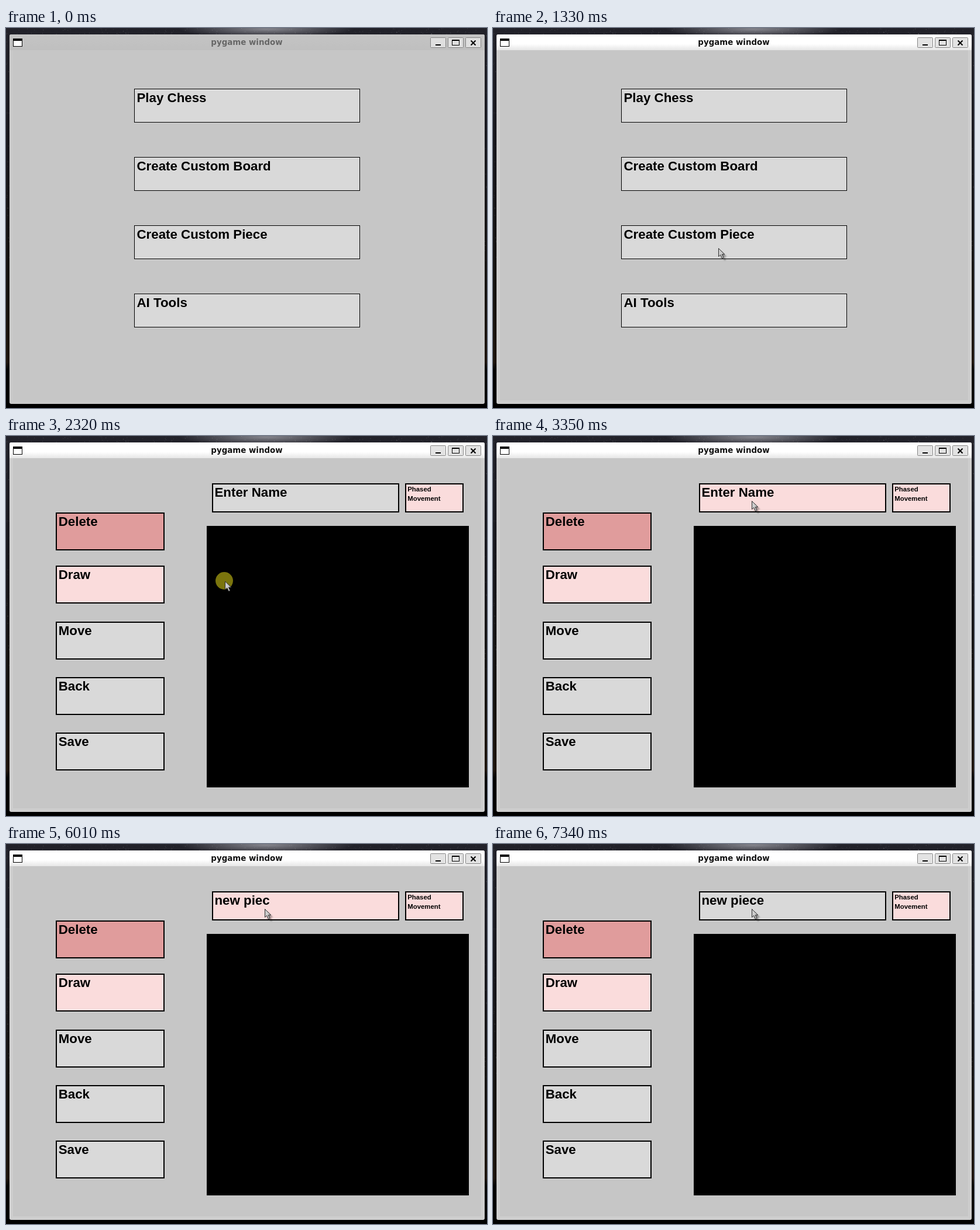
An HTML page that plays this animation: 822 by 651 pixels, repeating every 8000 ms.

```html
<!DOCTYPE html>
<html lang="en">
<head>
<meta charset="utf-8">
<title>Piece editor</title>
<style>
  html, body { margin: 0; width: 100%; height: 100%; overflow: hidden; background: #000; }
  svg { display: block; width: 822px; height: 651px; }
  .label { font: bold 22.3px "Liberation Sans", Arial, sans-serif; }
  .small { font: bold 11.4px "Liberation Sans", Arial, sans-serif; }
  .title { font: bold 13.4px "DejaVu Sans", sans-serif; text-anchor: middle; }
  .notice { font: 32px "Open Sans", "Noto Sans", sans-serif; }
</style>
</head>
<body>
<svg viewBox="0 0 822 651" xmlns="http://www.w3.org/2000/svg">
  <defs>
    <linearGradient id="sky" x2="0" y2="1">
      <stop offset="0" stop-color="#22222a"/>
      <stop offset=".3" stop-color="#17171d"/>
      <stop offset=".7" stop-color="#15120f"/>
      <stop offset=".88" stop-color="#1d140c"/>
      <stop offset=".9" stop-color="#000"/>
    </linearGradient>
    <radialGradient id="glow">
      <stop offset="0" stop-color="#85858d"/>
      <stop offset="1" stop-color="#85858d" stop-opacity="0"/>
    </radialGradient>
    <linearGradient id="barOn" x2="0" y2="1">
      <stop offset="0" stop-color="#f4f4f4"/>
      <stop offset=".15" stop-color="#fff"/>
      <stop offset=".6" stop-color="#fff"/>
      <stop offset="1" stop-color="#e6e6e6"/>
    </linearGradient>
    <linearGradient id="barOff" x2="0" y2="1">
      <stop offset="0" stop-color="#c4c4c4"/>
      <stop offset="1" stop-color="#bfbfbf"/>
    </linearGradient>
    <filter id="soft" x="-50%" y="-50%" width="200%" height="200%">
      <feGaussianBlur stdDeviation="1.2"/>
    </filter>
    <path id="arrow" d="M.5 .5V14.5L3.8 11.6L6.6 17.6L9 16.5L6.3 10.7H10.7Z"/>
  </defs>

  <rect width="822" height="651" fill="url(#sky)"/>
  <ellipse cx="445" cy="2" rx="150" ry="14" fill="url(#glow)"/>
  <g id="stars" fill="#fff"></g>

  <rect id="frame" x="6" y="11" width="812" height="633" rx="3"/>
  <path id="bar" d="M6 38V14q0-3 3-3H815q3 0 3 3V38Z"/>
  <rect x="12" y="38" width="800" height="600" fill="#c6c6c6"/>
  <rect x="12.5" y="18.5" width="15" height="13" fill="#fff" stroke="#000"/>
  <rect x="12" y="18" width="16" height="4"/>
  <text id="title" class="title" x="411.5" y="28.5">pygame window</text>
  <g id="controls" stroke="#858585"></g>
  <path d="M734 28h9v2h-9zM762 20h13v10h-13zM763 22v7h11v-7z" fill-rule="evenodd"/>
  <path d="M794.5 21.5l8 8m0-8l-8 8" stroke="#000" stroke-width="2"/>

  <g id="menu"></g>
  <g id="submenu"></g>
  <g id="editor">
    <rect x="343" y="154" width="448" height="448"/>
  </g>

  <circle id="click" cx="373" cy="248" r="15" fill="#7b750d"/>
  <g id="cursor">
    <use href="#arrow" x="4" y="4" opacity=".34" filter="url(#soft)"/>
    <use href="#arrow" fill="#cbcbcb" stroke="#303030"/>
  </g>

  <g id="notice">
    <rect width="822" height="651" fill="#d8d8d8"/>
    <text class="notice" x="66.5" y="339">Press enter to save your added text to the box</text>
  </g>
</svg>
<script>
const LOOP = 8000;
const GREY = "#d9d9d9", PINK = "#fadcdc", RED = "#e09c9c";
const $ = id => document.getElementById(id);

function add(parent, tag, attrs, text = "") {
  const node = document.createElementNS("http://www.w3.org/2000/svg", tag);
  for (const key in attrs) node.setAttribute(key, attrs[key]);
  node.textContent = text;
  parent.append(node);
  return node;
}

function box(parent, x, y, width, height, fill, line) {
  return add(parent, "rect", {
    x: x + line / 2, y: y + line / 2, width: width - line, height: height - line,
    fill, stroke: "#000", "stroke-width": line
  });
}

function label(parent, x, y, text, type = "label") {
  return add(parent, "text", { x, y, class: type }, text);
}

function menu(parent, top, names) {
  names.forEach((name, i) => {
    const y = top + 117 * i;
    box(parent, 219, y, 386, 58, GREY, 1);
    label(parent, 223.5, y + 23, name);
  });
}

menu($("menu"), 104, ["Play Chess", "Create Custom Board", "Create Custom Piece", "AI Tools"]);
menu($("submenu"), 237, ["Create New", "Edit", "Back"]);

const editor = $("editor");
[["Delete", 131, RED], ["Draw", 222, PINK], ["Move", 318, GREY], ["Back", 413, GREY], ["Save", 508, GREY]]
  .forEach(([name, y, fill]) => {
    box(editor, 85, y, 186, 65, fill, 2);
    label(editor, 89.7, y + 23, name);
  });
const field = box(editor, 352, 81, 320, 50, GREY, 2);
const fieldText = label(editor, 356.5, 104, "");
box(editor, 682, 81, 100, 50, PINK, 2);
label(editor, 686.2, 95, "Phased", "small");
label(editor, 686.2, 111, "Movement", "small");

for (const x of [725, 755, 785])
  add($("controls"), "rect", { x: x + .5, y: 16.5, width: 26, height: 17, rx: 1 });

// Faint stars along the visible edges of the desktop.
let seed = 7;
const random = () => (seed = seed * 16807 % 2147483647) / 2147483647;
for (let i = 0; i < 260; i++) {
  const top = i < 200;
  add($("stars"), "rect", {
    x: top ? random() * 822 : random() < .6 ? random() * 6 : 818 + random() * 4,
    y: top ? random() * 11 : random() * 400,
    width: 1, height: 1, opacity: random() * .22
  });
}

// Each step changes only the listed parts; the rest carries over.
let state = { screen: "menu", active: false, cursor: null, text: "Enter Name", lit: false, click: false };
const steps = [
  [0, {}],
  [330, { cursor: [351, 365] }],
  [660, { cursor: [356, 367] }],
  [1000, { active: true }],
  [1330, { cursor: [385, 377] }],
  [1660, { screen: "submenu" }],
  [1990, { cursor: [374, 339] }],
  [2320, { screen: "editor", cursor: [374, 248.5], click: true }],
  [2650, { cursor: [346, 274], click: false }],
  [2990, { cursor: [412, 125] }],
  [3350, { cursor: [442, 111], lit: true }],
  [4680, { text: "new " }],
  [5680, { text: "new pie" }],
  [6010, { text: "new piec" }],
  [6340, { screen: "notice" }],
  [7340, { screen: "editor", text: "new piece", lit: false }]
].map(([at, change]) => state = { ...state, ...change, at });

const show = (id, on) => $(id).setAttribute("visibility", on ? "visible" : "hidden");

function render({ screen, active, cursor, text, lit, click }) {
  for (const id of ["menu", "submenu", "editor", "notice"]) show(id, id === screen);
  show("click", click);
  show("cursor", cursor && screen !== "notice");
  if (cursor) $("cursor").setAttribute("transform", `translate(${cursor})`);
  $("bar").setAttribute("fill", active ? "url(#barOn)" : "url(#barOff)");
  $("frame").setAttribute("fill", active ? "#cecece" : "#c9c9c9");
  $("title").setAttribute("fill", active ? "#111" : "#666");
  $("controls").setAttribute("fill", active ? "#e3e3e3" : "#dfdfdf");
  field.setAttribute("fill", lit ? PINK : GREY);
  fieldText.textContent = text;
}

const start = performance.now();
let current;
function tick() {
  const time = (performance.now() - start) % LOOP;
  const step = steps.findLast(s => s.at <= time);
  if (step !== current) render(current = step);
  requestAnimationFrame(tick);
}
tick();
</script>
</body>
</html>
```
